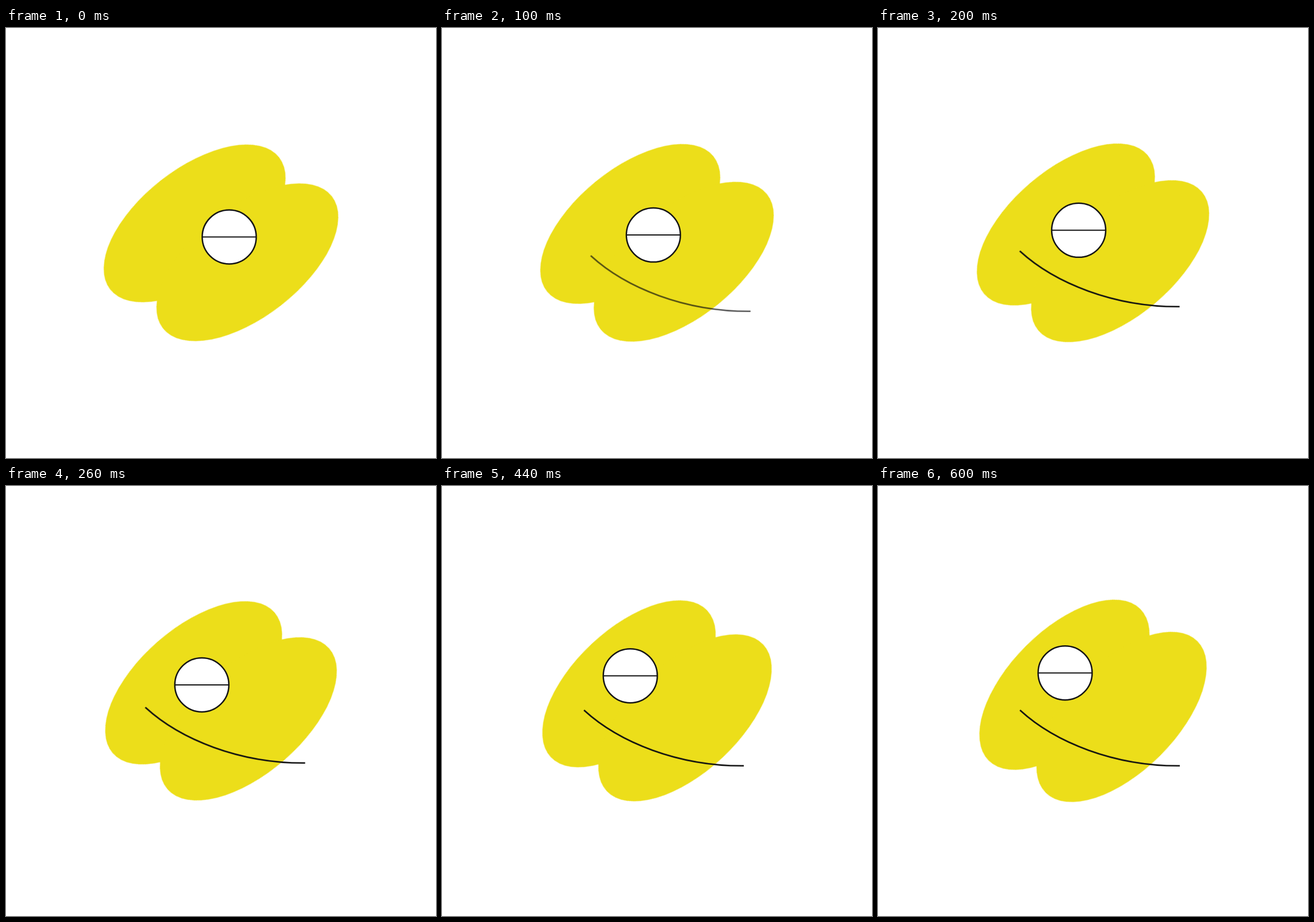
Animation, 748 px wide and 748 px high, one loop 2 s. Source, as an HTML page:

```html
<!DOCTYPE html>
<html lang="en">
<head>
<meta charset="utf-8">
<title>Sleepy face</title>
<style>
  :root { --soft: cubic-bezier(.33, 0, .67, 1); }

  html, body { margin: 0; width: 100%; height: 100%; overflow: hidden; background: #fff; }
  svg { display: block; width: 100vw; height: 100vh; }

  #body, #mouth, #eye { animation: 2s linear infinite both; }

  #body { fill: #ecde1a; animation-name: turn; }
  @keyframes turn {
    0% { transform: translate(374px, 373.7px) rotate(-38deg); }
    30%, 100% { transform: translate(374px, 373.7px) rotate(-45deg); }
  }

  /* The mouth slides in, overshoots and settles back. */
  #mouth { fill: none; stroke: #111; stroke-width: 2.6; animation-name: slide, fade; animation-timing-function: var(--soft); }
  @keyframes slide {
    0% { transform: translate(265.7px, 400.8px); }
    14% { transform: translate(242px, 384.8px); }
    22%, 100% { transform: translate(247px, 389.9px); }
  }
  @keyframes fade {
    0% { opacity: 0; }
    8%, 100% { opacity: 1; }
  }

  #eye {
    stroke: #151515;
    offset-path: path("M388.5 363.5C357 362.3 331.2 343.5 325.5 325.2");
    offset-rotate: 0deg;
    animation-name: drift;
    animation-timing-function: cubic-bezier(.2, .28, .5, 1);
  }
  @keyframes drift {
    0% { offset-distance: 0%; }
    30%, 100% { offset-distance: 100%; }
  }
</style>
</head>
<body>
<svg viewBox="0 0 748 748">
  <g id="body">
    <ellipse cx="-15.3" cy="-54.9" rx="186.5" ry="95.2"/>
    <ellipse cx="15.3" cy="54.9" rx="186.5" ry="95.2"/>
  </g>
  <path id="mouth" d="M0 0C61 56 164 97.5 278 96.8"/>
  <g id="eye">
    <circle r="47" fill="#fff" stroke-width="2.5"/>
    <path d="M-47 0H47" stroke-width="2"/>
  </g>
</svg>
</body>
</html>
```
